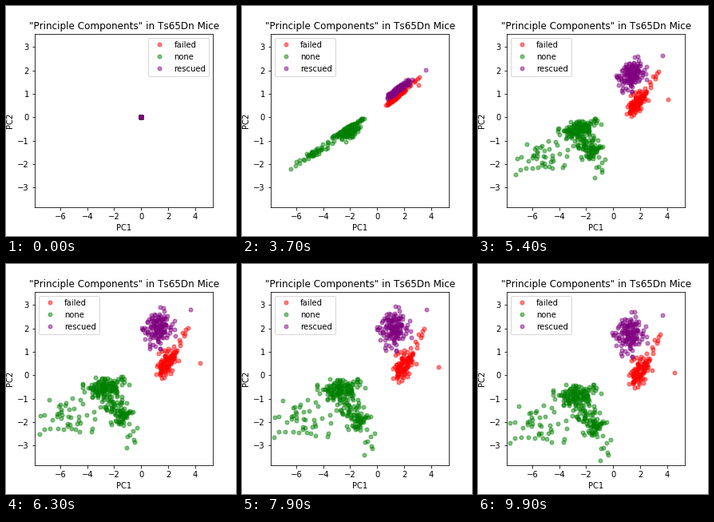
Animation of 288 by 288 pixels, one loop 10 s. Source, as a matplotlib script:

```python
import matplotlib.pyplot as plt
import numpy as np
from matplotlib.animation import FuncAnimation

FRAMES, STEP = 100, 100
LEGEND_MOVE = 3.3  # seconds
SLOPE = 0.41       # slope of the line on which the points first spread
rng = np.random.default_rng(5)
plt.rcParams['text.kerning_factor'] = 6


def blob(n, x, y, sx, sy, tilt=0.0):
    """Normal cloud of n points, sheared by tilt."""
    dx = sx * rng.normal(size=n).clip(-2.4, 2.6)
    dy = sy * rng.normal(size=n).clip(-2.4, 2.4)
    return np.array([x + dx, y + tilt * dx + dy])


def strays(*places):
    return np.array(places).T


# Resting places of each group
GROUPS = {
    'failed': ('red', [
        blob(82, 1.95, 0.15, 0.38, 0.34, 0.2),
        blob(22, 2.65, 0.75, 0.33, 0.16, 1.0),
        strays((4.55, 0.1)),
    ]),
    'none': ('green', [
        blob(130, -2.75, -0.88, 0.72, 0.25, 0.03),
        blob(92, -1.65, -2.0, 0.58, 0.33, -0.45),
        blob(42, -5.4, -2.2, 1.1, 0.5),
        strays((-0.4, -3.3), (-0.35, -3.4), (-0.95, -3.65), (-0.2, -2.75)),
    ]),
    'rescued': ('purple', [
        blob(134, 1.2, 1.72, 0.52, 0.4, 0.2),
        strays((3.65, 2.55)),
    ]),
}


def logistic(t, middle, rate):
    return 1 / (1 + np.exp(-rate * (t - middle)))


def place(rest, t):
    """Grow along a line, lift it, open into two dimensions, then settle."""
    x, y = rest
    along = 0.6 * x + 0.55 * y
    line = np.array([along, SLOPE * along + 0.45 * logistic(t, 3.1, 3)])
    hover = 0.33 * np.clip((9.9 - t) / 2.7, 0, 1)
    spread = np.array([x, y + hover])
    opened = logistic(t, 4.8, 1.6)
    return logistic(t, 1.593, 6.2) * ((1 - opened) * line + opened * spread)


fig, ax = plt.subplots(figsize=(4, 4), dpi=72)
fig.subplots_adjust(left=0.125, right=0.9, bottom=0.125, top=0.88)
ax.set(xlim=(-7.896, 5.335), ylim=(-3.843, 3.567), xlabel='PC1', ylabel='PC2',
       title='"Principle Components" in Ts65Dn Mice')
rests, dots = {}, {}
for name, (color, parts) in GROUPS.items():
    rests[name] = np.hstack(parts)
    dots[name], = ax.plot([], [], 'o', color=color, alpha=0.5,
                          markersize=5, label=name)
legend = ax.legend(loc='upper right')


def update(frame):
    t = frame * STEP / 1000
    for name, line in dots.items():
        line.set_data(*place(rests[name], t))
    legend.set_loc('upper right' if t < LEGEND_MOVE else 'upper left')
    return [*dots.values(), legend]


anim = FuncAnimation(fig, update, frames=FRAMES, interval=STEP, repeat=True,
                     repeat_delay=0, blit=False)
plt.show()
```
